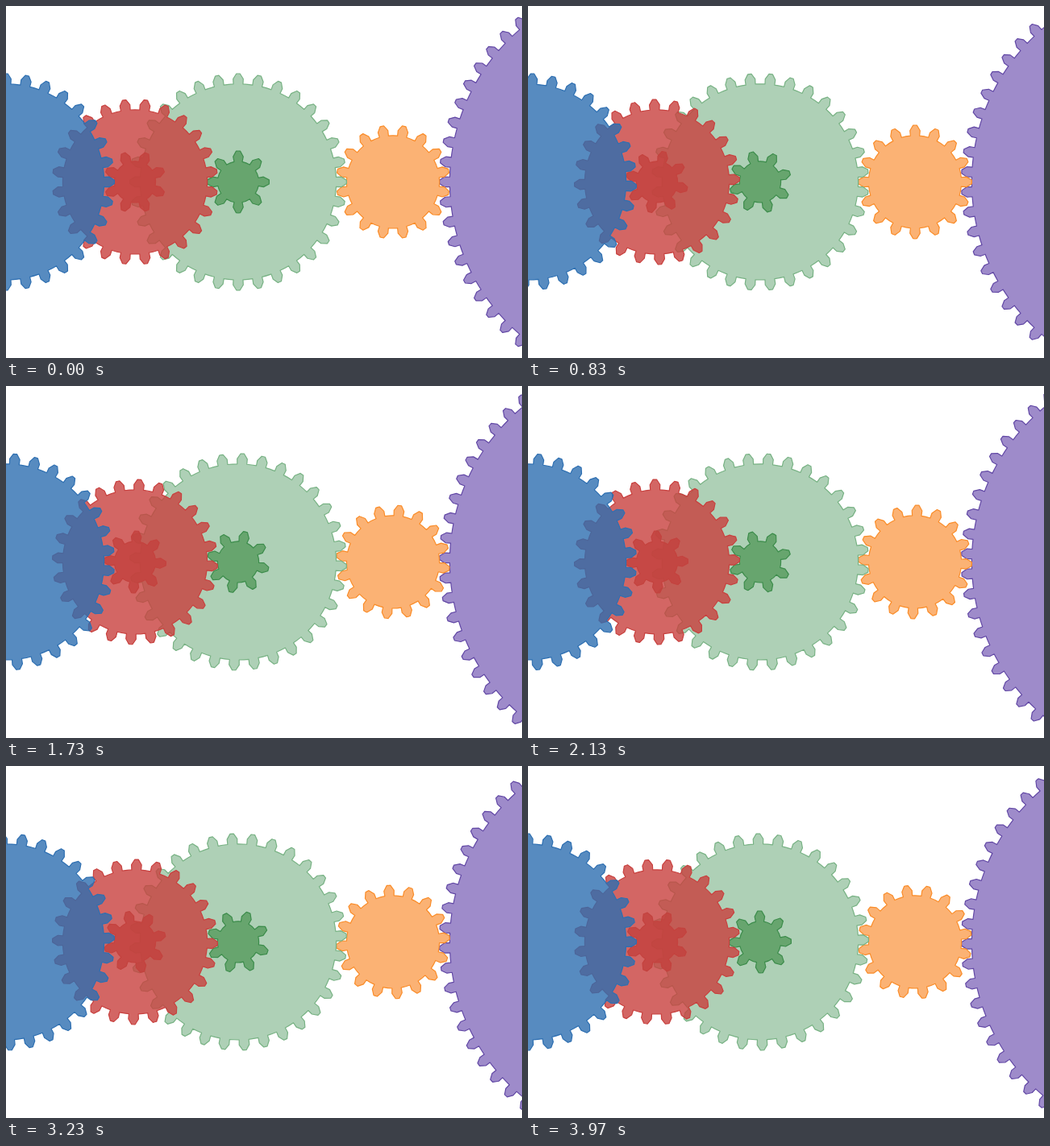
Animation of 640x437 px, one loop 4010 ms. Source, as an HTML page:

```html
<!DOCTYPE html>
<html lang="en">
<head>
<meta charset="utf-8">
<title>Gear train</title>
<style>
html, body { margin: 0; width: 100%; height: 100%; overflow: hidden; background: #fff; }
svg { display: block; width: 640px; height: 437px; }
path { fill-opacity: .8; stroke-width: 1.2; stroke-linejoin: round; }
</style>
</head>
<body>
<svg viewBox="0 0 640 437"></svg>
<script>
const LOOP = 4010, STEPS = 120, CY = 218.4, MODULE = 4, DEPTH = 6.4;

// Back to front. turn: degrees per loop; half: starts with a gap at the top.
const gears = [
  { x: 800, teeth: 64, turn: 67.5, fill: '#866fbd', stroke: '#6248a5' },
  { x: 480, teeth: 16, turn: -270, half: true, fill: '#fb9f52', stroke: '#fa8c28' },
  { x: 288, teeth: 32, turn: 135, fill: '#9ac5a4', stroke: '#78b284' },
  { x: 288, teeth: 8, turn: 135, fill: '#569b5d', stroke: '#3c8c4b' },
  { x: 160, teeth: 24, turn: -45, half: true, fill: '#c8403e', stroke: '#c8403e' },
  { x: 160, teeth: 8, turn: -45, half: true, fill: '#c4423e', stroke: '#c4423e' },
  { x: 0, teeth: 32, turn: 11.25, fill: '#2e6fb1', stroke: '#2e6fb1' }
];

function outline(teeth) {
  const pitch = teeth * MODULE, root = pitch - DEPTH, tip = pitch + DEPTH;
  const da = Math.PI / teeth;
  const at = (r, a) => `${(r * Math.sin(a)).toFixed(3)},${(-r * Math.cos(a)).toFixed(3)}`;
  let d = '';
  for (let i = 0; i < teeth; i++) {
    const a = i * 2 * da;
    d += (i ? 'L' : 'M') + at(root, a - da / 2)
      + 'L' + at(pitch, a - da / 2)
      + 'L' + at(tip, a - da / 6)
      + `A${tip},${tip} 0 0 1 ` + at(tip, a + da / 6)
      + 'L' + at(pitch, a + da / 2)
      + 'L' + at(root, a + da / 2)
      + `A${root},${root} 0 0 1 ` + at(root, a + da * 1.5);
  }
  return d + 'Z';
}

const svg = document.querySelector('svg');
for (const g of gears) {
  g.node = document.createElementNS('http://www.w3.org/2000/svg', 'path');
  g.node.setAttribute('d', outline(g.teeth));
  g.node.setAttribute('fill', g.fill);
  g.node.setAttribute('stroke', g.stroke);
  svg.append(g.node);
}

function draw() {
  const ticks = Math.floor(performance.now() % LOOP / 10);
  const step = Math.min(STEPS - 1, Math.floor((ticks + 0.5) * 0.3));
  for (const g of gears) {
    const angle = (g.half ? 180 / g.teeth : 0) + g.turn * step / STEPS;
    g.node.setAttribute('transform', `translate(${g.x} ${CY}) rotate(${angle})`);
  }
  requestAnimationFrame(draw);
}
draw();
</script>
</body>
</html>
```
